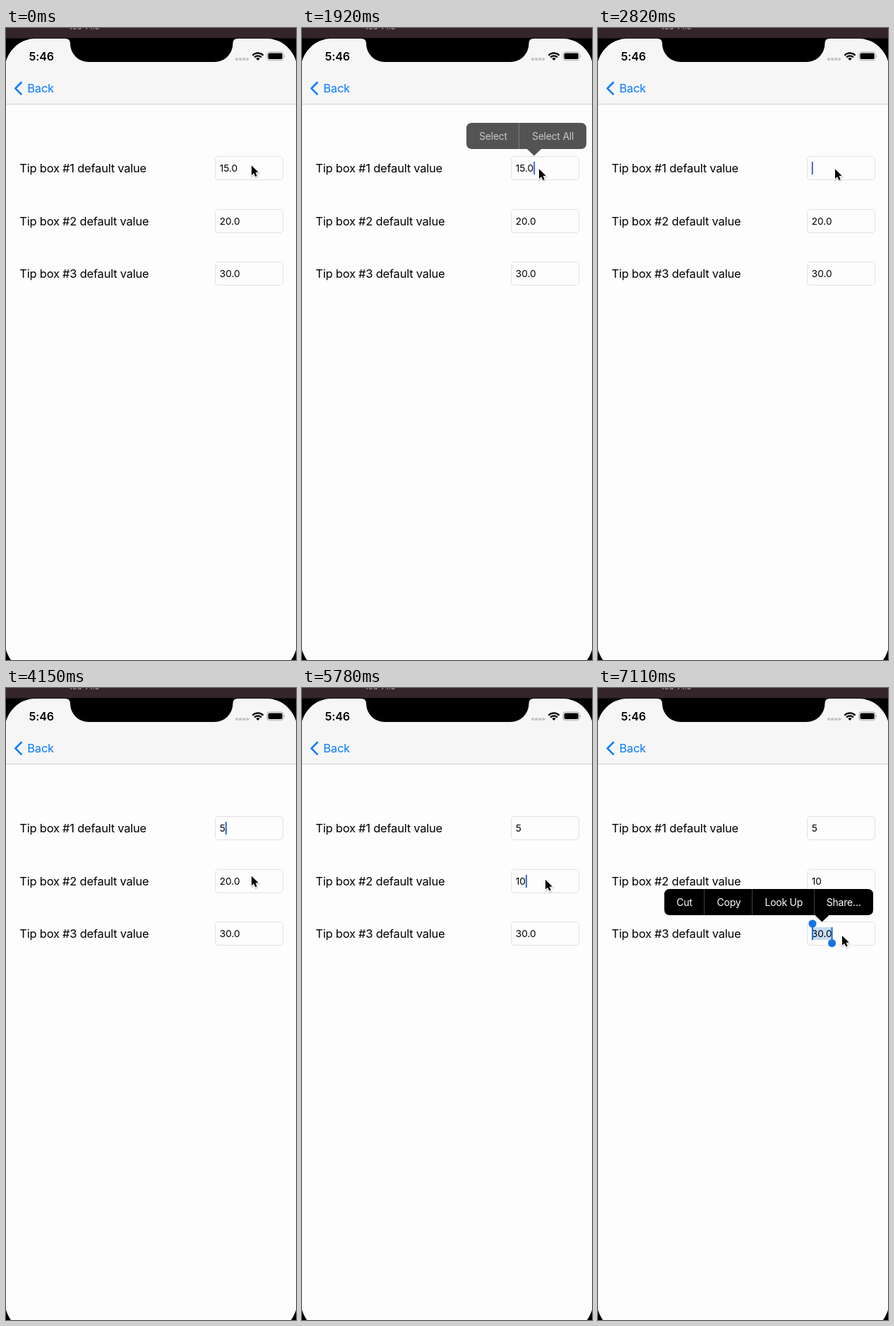
Write an HTML page that moves like this. It is 411 px wide and 893 px high and loops after 8 s.

```html
<!DOCTYPE html>
<html lang="en">
<head>
<meta charset="utf-8">
<title>Tip settings</title>
<style>
  html, body { margin: 0; width: 100%; height: 100%; overflow: hidden; background: #000; }
  svg { display: block; width: 411px; height: 893px; }
  text { font-family: Inter, "Open Sans", sans-serif; white-space: pre; }
  .label { font-size: 16.5px; letter-spacing: -0.23px; }
  .value { font-size: 13.7px; letter-spacing: -0.05px; }
  .item { font-size: 14px; letter-spacing: -0.25px; text-anchor: middle; }
</style>
</head>
<body>
<svg viewBox="0 0 411 893">
  <rect width="411" height="893"/>
  <rect width="411" height="14.5" fill="#33252a"/>
  <text x="89" y="1.5" font-size="11.5" fill="#b5aeb0">105 14.5</text>

  <clipPath id="screen"><rect x="-1.5" y="15" width="414" height="896" rx="44"/></clipPath>
  <g clip-path="url(#screen)">
    <rect y="15" width="411" height="896" fill="#fdfdfd"/>
    <rect y="15" width="411" height="92" fill="#f6f6f6"/>
    <rect y="107" width="411" height="1" fill="#cfcfcf"/>
  </g>
  <path d="M84 14 V15 Q91 15 91 22 A26 26 0 0 0 117 48 H295.5 A26 26 0 0 0 321.5 22 Q321.5 15 328 15 V14 Z"/>

  <text x="32.5" y="45.5" font-size="16" font-weight="600" letter-spacing="-.1">5:46</text>
  <g fill="#c6c6c6">
    <rect x="325" y="42" width="4" height="4" rx="1.2"/>
    <rect x="330" y="42" width="4" height="4" rx="1.2"/>
    <rect x="335" y="42" width="4" height="4" rx="1.2"/>
    <rect x="340" y="42" width="4" height="4" rx="1.2"/>
  </g>
  <g fill="none" stroke="#000" stroke-width="2.3">
    <path d="M349.4 38.6 A10.6 10.6 0 0 1 364.6 38.6"/>
    <path d="M352.1 41.5 A6.8 6.8 0 0 1 361.9 41.5"/>
  </g>
  <path d="M357 46 L354.4 43.3 A3.7 3.7 0 0 1 359.6 43.3 Z"/>
  <rect x="369.9" y="33.9" width="23.4" height="11.8" rx="3.6" fill="none" stroke="#a8a8a8"/>
  <rect x="371.5" y="35.5" width="20.2" height="8.6" rx="2"/>
  <path d="M394.6 37.8 Q396.4 39.8 394.6 41.8 Z" fill="#a8a8a8"/>

  <path d="M21.6 77 L13.3 85.3 L21.6 93.6" fill="none" stroke="#0a7cff" stroke-width="2.6" stroke-linecap="round" stroke-linejoin="round"/>
  <text class="label" x="30.3" y="91" fill="#0a7cff">Back</text>

  <g id="form"></g>
  <rect id="caret" width="2" height="18" fill="#3c66d8"/>
  <g id="menu"></g>
  <g id="pointer">
    <path d="M0 0 V13.6 L3.2 10.7 L5.4 15.6 L7.7 14.6 L5.6 9.8 L9.7 9.5 Z" transform="translate(.6 1.6)" fill="#000" stroke="#000" stroke-width="2.4" opacity=".14"/>
    <path d="M0 0 V13.6 L3.2 10.7 L5.4 15.6 L7.7 14.6 L5.6 9.8 L9.7 9.5 Z" fill="#000" stroke="#fff" stroke-width="1.6" paint-order="stroke"/>
  </g>
</svg>
<script>
const LOOP = 8000;
const TEXT_X = 302.8;
const ROWS = [198, 273, 347];
const BLUE = "#1672e2";

const MENUS = {
  select: { left: 233, right: 403, top: 134, tip: 329, bars: [307],
    items: [["Select", 271], ["Select All", 355.5]] },
  edit: { left: 94, right: 390, tip: 317.5, bars: [150, 218, 306],
    items: [["Cut", 122.5], ["Copy", 185.5], ["Look Up", 263.3], ["Share…", 348.3]] }
};

const start = {
  at: [348, 194.3], values: ["15.0", "20.0", "30.0"],
  caret: -1, dim: 1, selected: -1, menu: null, shade: 1
};

// Each step changes part of the state; everything else is kept.
const steps = [
  [140, { at: [353, 202] }],
  [290, { at: [358, 213] }],
  [440, { at: [357, 200] }],
  [1040, { at: [348, 200] }],
  [1190, { at: [337, 199.3], caret: 0, dim: .5 }],
  [1330, { at: [336, 199.3], dim: 1 }],
  [1920, { menu: "select", shade: .67 }],
  [2070, { shade: 1 }],
  [2220, { shade: .5 }],
  [2370, { menu: null, v0: "15." }],
  [2520, { v0: "15" }],
  [2670, { v0: "1" }],
  [2820, { v0: "" }],
  [3560, { dim: 0 }],
  [3860, { v0: "5", dim: 1 }],
  [4010, { at: [342, 228] }],
  [4150, { at: [348, 265.7] }],
  [4300, { at: [347, 269] }],
  [4450, { at: [345, 271] }],
  [4590, { caret: 1, dim: .5 }],
  [4740, { dim: 1 }],
  [4890, { caret: -1, selected: 1, menu: "edit", shade: .67 }],
  [5040, { shade: 1 }],
  [5630, { menu: null, selected: -1, caret: 1, v1: "1" }],
  [5780, { v1: "10" }],
  [6080, { at: [345, 287] }],
  [6230, { at: [346, 320] }],
  [6380, { at: [346, 344] }],
  [6520, { at: [346, 350] }],
  [6670, { caret: 2, dim: .5 }],
  [6810, { dim: 1 }],
  [6960, { caret: -1, selected: 2, menu: "edit", shade: .67 }],
  [7110, { shade: 1 }]
];

const $ = id => document.getElementById(id);

function add(parent, tag, attrs, text) {
  const el = document.createElementNS("http://www.w3.org/2000/svg", tag);
  set(el, attrs);
  if (text) el.textContent = text;
  parent.append(el);
  return el;
}

function set(el, attrs) {
  for (const key in attrs) el.setAttribute(key, attrs[key]);
}

const show = (el, on) => el.setAttribute("visibility", on ? "visible" : "hidden");

const fields = ROWS.map((y, i) => {
  const form = $("form");
  add(form, "text", { class: "label", x: 19.3, y: y + 6.3 }, `Tip box #${i + 1} default value`);
  add(form, "rect", { x: 296.5, y: y - 16.5, width: 96, height: 33, rx: 4.5, fill: "#fdfdfd", stroke: "#e1e1e1" });
  const mark = add(form, "rect", { x: 304, y: y - 9, height: 18, fill: "#c8dcf2" });
  const text = add(form, "text", { class: "value", x: TEXT_X, y: y + 5 });
  const grips = add(form, "g", { fill: BLUE });
  add(grips, "rect", { x: 303, y: y - 14, width: 2, height: 23 });
  add(grips, "circle", { cx: 304, cy: y - 14, r: 5.5 });
  const end = add(grips, "g", {});
  add(end, "rect", { x: -1, y: y - 9, width: 2, height: 22 });
  add(end, "circle", { cx: 0, cy: y + 13.5, r: 5.5 });
  return { text, mark, grips, end };
});

function buildMenu({ left, right, tip, bars, items }) {
  const g = add($("menu"), "g", {});
  const body = add(g, "g", {});
  add(body, "path", { d: `M${left + 8} 0 H${right - 8} q8 0 8 8 V29 q0 8 -8 8 H${tip + 10} L${tip} 46.5 L${tip - 10} 37 H${left + 8} q-8 0 -8 -8 V8 q0 -8 8 -8 Z` });
  for (const x of bars) add(g, "rect", { x, width: 1, height: 37, fill: "#fff", opacity: .25 });
  const words = add(g, "g", { fill: "#fff" });
  for (const [word, x] of items) add(words, "text", { class: "item", x, y: 23.6 }, word);
  return { g, body, words };
}

const menus = {};
for (const name in MENUS) menus[name] = buildMenu(MENUS[name]);

function stateAt(t) {
  const s = { ...start, values: [...start.values] };
  for (const [time, change] of steps) {
    if (time > t) break;
    for (const key in change) {
      if (/^v\d/.test(key)) s.values[key[1]] = change[key];
      else s[key] = change[key];
    }
  }
  return s;
}

function draw(t) {
  const s = stateAt(t);
  const width = i => s.values[i] ? fields[i].text.getComputedTextLength() : 0;

  fields.forEach(({ text, mark, grips, end }, i) => {
    if (text.textContent !== s.values[i]) text.textContent = s.values[i];
    const on = s.selected === i;
    show(mark, on);
    show(grips, on);
    if (on) {
      const w = width(i);
      set(mark, { width: w - 1 });
      set(end, { transform: `translate(${TEXT_X + w} 0)` });
    }
  });

  show($("caret"), s.caret >= 0);
  if (s.caret >= 0) {
    set($("caret"), { x: TEXT_X + width(s.caret), y: ROWS[s.caret] - 9, opacity: s.dim });
  }

  for (const name in menus) {
    const { g, body, words } = menus[name];
    show(g, s.menu === name);
    if (s.menu !== name) continue;
    const top = MENUS[name].top ?? ROWS[s.selected] - 63;
    set(g, { transform: `translate(0 ${top})` });
    set(body, { opacity: s.shade });
    set(words, { opacity: s.shade });
  }

  set($("pointer"), { transform: `translate(${s.at})` });
}

const begin = performance.now();
function tick() {
  draw((performance.now() - begin) % LOOP);
  requestAnimationFrame(tick);
}
tick();
</script>
</body>
</html>
```
